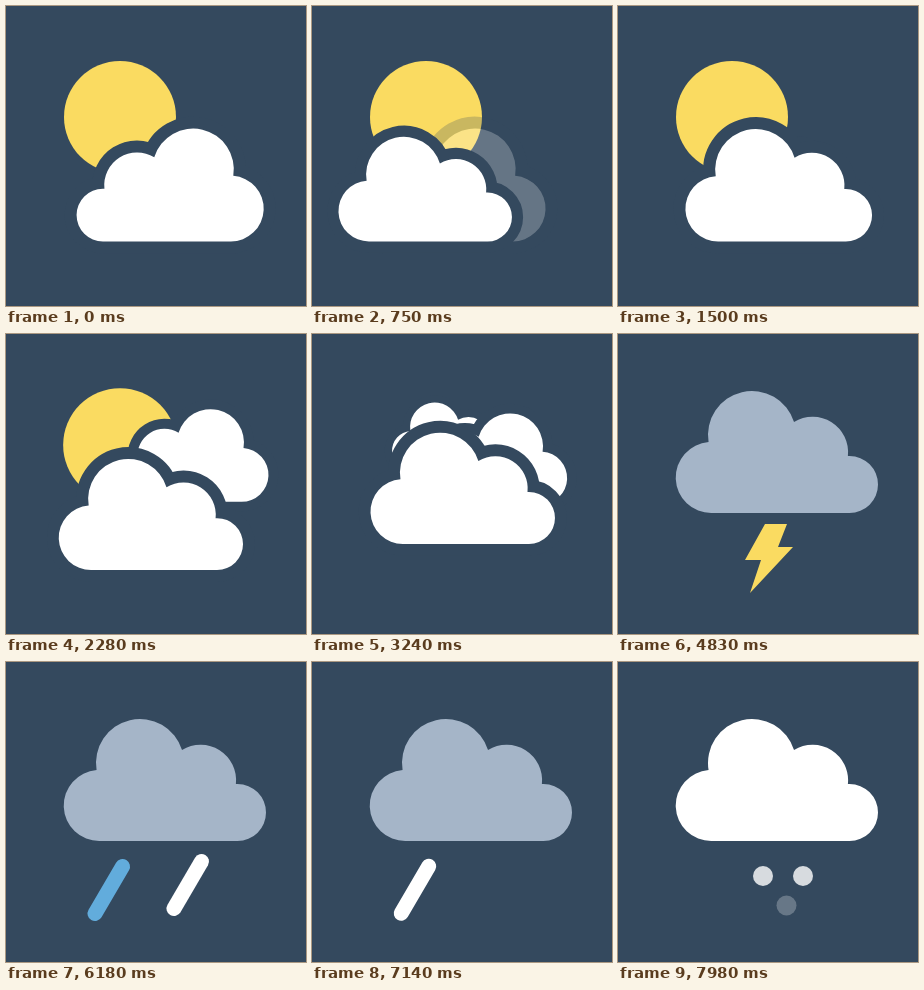
Write an HTML page that moves like this. It is 300x300 px and loops after 8 s.

```html
<!DOCTYPE html>
<html lang="en">
<head>
<meta charset="utf-8">
<title>Weather</title>
<style>
  html, body { margin: 0; width: 100%; height: 100%; overflow: hidden; background: #34495e; }
  svg { display: block; width: 100%; height: 100%; }
  .cloud { fill: #fff; stroke: #34495e; stroke-width: 26; stroke-linejoin: round; paint-order: stroke; }
  .drop { stroke-width: 15; stroke-linecap: round; }
</style>
</head>
<body>
<svg viewBox="0 0 300 300">
  <defs>
    <path id="shape" transform="translate(-159 -118)"
      d="M93.5 179A35.5 35.5 0 0 1 90.57 108.1A44 44 0 0 1 176.03 88A35.5 35.5 0 0 1 229.9 122H231.5A28.5 28.5 0 0 1 231.5 179Z"/>
  </defs>
  <circle id="sun" cx="114" cy="111" fill="#fadb61"/>
  <use id="far" href="#shape" class="cloud"/>
  <use id="back" href="#shape" class="cloud"/>
  <use id="first" href="#shape" class="cloud"/>
  <path id="bolt" fill="#fadb61" d="M147 190H169L160 213H175L132 259L143 226H127Z"/>
  <use id="front" href="#shape" class="cloud"/>
  <g id="rain"></g>
  <g id="snow" fill="#fff"></g>
</svg>
<script>
const $ = id => document.getElementById(id);
const set = (el, attrs) => { for (const k in attrs) el.setAttribute(k, attrs[k]); };
const add = (parent, tag, attrs) => {
  const el = document.createElementNS('http://www.w3.org/2000/svg', tag);
  set(el, attrs);
  return parent.appendChild(el);
};

const mix = (a, b, k) => a + (b - a) * k;
const easeIn = k => k * k;
const easeOut = k => 1 - (1 - k) ** 2;
const easeInOut = k => k < .5 ? 2 * k * k : 1 - 2 * (1 - k) ** 2;
const backIn = (k, s = 1.7) => k * k * ((s + 1) * k - s);
const backOut = (k, s = 1.7) => 1 - backIn(1 - k, s);

let t = 0;
const part = (from, to) => Math.min(1, Math.max(0, (t - from) / (to - from)));

function place(id, x, y, scale, flip = 1, opacity = 1) {
  set($(id), { transform: `translate(${x} ${y}) scale(${scale * flip} ${scale})`, opacity });
}

// x, y of the upper end, then the times of appearing and of falling away
const drops = [
  ['#62acdc', 202, 198, 5490, 5750, 5910, 6110],
  ['#62acdc', 120, 198.5, 5650, 5910, 6060, 6320],
  ['#fff', 195.5, 199.5, 5950, 6170, 6610, 7000],
  ['#fff', 119.5, 199.5, 6240, 6480, 6950, 7410]
].map(([stroke, ...spec]) => ({ spec, el: add($('rain'), 'line', { class: 'drop', stroke }) }));

const flakes = [[145, 214, 7740, 8040], [185, 214, 7740, 8040], [168.5, 243.5, 7920, 8160]]
  .map(([cx, cy, ...time]) => ({ time, el: add($('snow'), 'circle', { cx, cy, r: 10 }) }));

function drawSky() {
  set($('sun'), { r: Math.max(0, 56 * (1 - backIn(part(2250, 2550)))) });

  const leave = part(600, 800);
  place('first', 164 - 32 * leave, 179, .925, -1, 1 - leave);

  const merge = easeInOut(part(3090, 3420));
  const hidden = t > 3480 ? 0 : 1;

  const rise = easeOut(part(1470, 1830));
  place('back', mix(mix(164, 185.5, rise), 171, merge), mix(mix(180, 121.5, rise), 130, merge),
    mix(mix(.5, .76, rise), .73, merge), -1, t > 1470 ? hidden : 0);

  const pop = backOut(part(2490, 2850), 2);
  place('far', mix(112.5, 170, merge), mix(83.5, 129, merge), pop * mix(.6, .5, merge), 1, t > 2490 ? hidden : 0);
}

function drawFront() {
  const grow = .925 * backOut(part(590, 1200), 2.28);
  const shift = easeOut(part(1470, 1830));
  const merge = easeInOut(part(3090, 3420));
  const swell = backOut(part(3240, 3870), 3.5);
  const scale = mix(mix(grow, .911, shift), 1, swell);
  const x = mix(mix(164 * easeOut(part(600, 940)), 145, shift), 159, merge);
  const y = mix(mix(235.5 - 61 * grow, 180.5, shift), 118, merge);
  place('front', x, y, scale, 1, t > 590 ? 1 : 0);

  const dark = part(4370, 4680) - part(7430, 7740);
  const rgb = [165, 181, 200].map(c => Math.round(mix(255, c, dark)));
  $('front').style.fill = `rgb(${rgb})`;
  $('front').style.stroke = t > 4000 ? 'none' : '';
}

function drawFall() {
  const dy = mix(-81, 0, backOut(part(4450, 4830), 2.2)) + 120 * easeIn(part(5100, 5500));
  set($('bolt'), { transform: `translate(0 ${dy})`, opacity: t > 4450 && t < 5500 ? 1 : 0 });

  for (const { el, spec: [x, y, inA, inB, outA, outB] } of drops) {
    const grow = easeOut(part(inA, inB));
    const out = part(outA, outB);
    const fall = easeIn(out);
    set(el, {
      x2: -27.5 * grow, y2: 47 * grow,
      transform: `translate(${x - 16 * fall} ${y + 28 * fall})`,
      opacity: Math.min(1, grow * 4, 2 * (1 - out))
    });
  }

  for (const { el, time } of flakes) set(el, { opacity: part(...time) });
}

function frame() {
  t = performance.now() % 8000;
  drawSky();
  drawFront();
  drawFall();
  requestAnimationFrame(frame);
}
frame();
</script>
</body>
</html>
```
